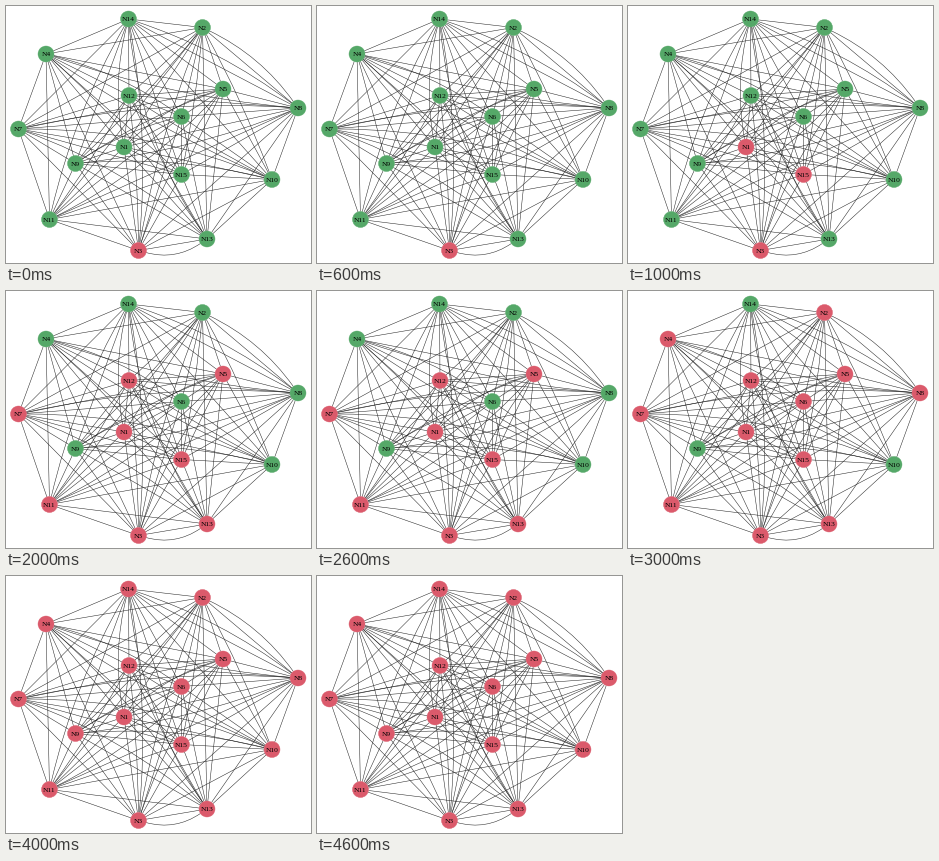
A matplotlib script that plays this animation: 305x257 px, repeating every 5000 ms.

```python
from itertools import combinations

import numpy as np
import matplotlib.pyplot as plt
from matplotlib.animation import FuncAnimation
from matplotlib.patches import Circle, PathPatch
from matplotlib.path import Path

W, H, DPI = 305, 257, 100
R = 8
GAP = 1.5
PX = 72 / DPI
GREEN, RED = "#55a868", "#db5a6b"

# Node centres, N1 to N15
NODES = np.array([
    (118, 141), (196.5, 21.5), (132.5, 244.5), (40, 48), (217, 83),
    (175.5, 110.5), (12.5, 123), (292, 102), (69.5, 157.5), (266, 173.5),
    (43.5, 213.5), (123, 89.5), (201, 233), (122.5, 13), (175.5, 168.5),
])
DOUBLE = [(2, 8), (14, 8), (3, 13)]

# Nodes that turn red at each step; the last step takes the rest
WAVES = [{3}, {1, 15}, {5, 7, 11, 12, 13}, {2, 4, 6, 8}]
WAVES.append(set(range(1, len(NODES) + 1)).difference(*WAVES))

T = np.linspace(0, 1, 60)[:, None]

fig = plt.figure(figsize=(W / DPI, H / DPI), dpi=DPI, facecolor="white")
ax = fig.add_axes([0, 0, 1, 1])
ax.set_xlim(0, W)
ax.set_ylim(H, 0)
ax.axis("off")


def control(p, q, bow):
    """Control point of a curve from p to q that bulges by bow pixels."""
    dx, dy = (q - p) / np.hypot(*(q - p))
    return (p + q) / 2 + 2 * bow * np.array([-dy, dx])


def is_clear(p, c, q, others):
    curve = (1 - T) ** 2 * p + 2 * T * (1 - T) * c + T ** 2 * q
    gaps = np.linalg.norm(curve[:, None] - others, axis=2)
    return gaps.min() > R + GAP


def rim(centre, toward):
    v = toward - centre
    return centre + v / np.hypot(*v) * R


def draw_link(a, b, bow=None):
    """Join two nodes; by default bend just enough to miss the others."""
    p, q = NODES[a - 1], NODES[b - 1]
    if bow is None:
        others = np.delete(NODES, [a - 1, b - 1], axis=0)
        tries = sorted(range(-24, 25), key=abs)
        bow = next((s for s in tries
                    if is_clear(p, control(p, q, s), q, others)), 0)
    c = control(p, q, bow)
    path = Path([rim(p, c), c, rim(q, c)],
                [Path.MOVETO, Path.CURVE3, Path.CURVE3])
    ax.add_patch(PathPatch(path, fc="none", ec="#222222", lw=0.5 * PX))


for a, b in combinations(range(1, len(NODES) + 1), 2):
    draw_link(a, b)
for a, b in DOUBLE:
    # The second strand bulges away from the middle of the graph
    p, q = NODES[a - 1], NODES[b - 1]
    out = control(p, q, 1) - (p + q) / 2
    side = np.sign(out @ ((p + q) / 2 - NODES.mean(axis=0)))
    draw_link(a, b, side * 8)

dots = []
for n, (x, y) in enumerate(NODES, 1):
    dots.append(ax.add_patch(Circle((x, y), R, lw=0.4 * PX, zorder=2)))
    ax.text(x, y + 0.2, f"N{n}", family="Liberation Serif", size=7.5 * PX,
            ha="center", va="center_baseline", zorder=3)


def update(step):
    hit = set().union(*WAVES[:step + 1])
    for n, dot in enumerate(dots, 1):
        dot.set_color(RED if n in hit else GREEN)
    return dots


anim = FuncAnimation(fig, update, frames=len(WAVES), interval=1000,
                     repeat=True, repeat_delay=0)
plt.show()
```
